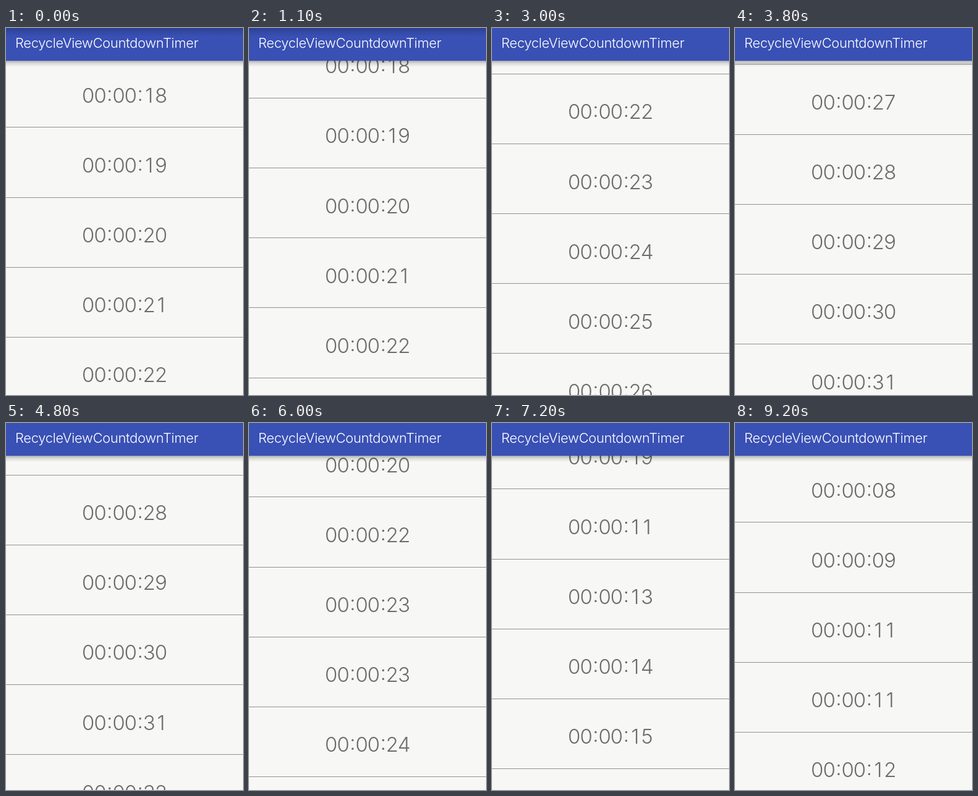
An HTML page with a canvas for the animation above (9400 ms loop, 384x594 px).

```html
<!DOCTYPE html>
<html lang="en">
<head>
<meta charset="utf-8">
<title>RecycleViewCountdownTimer</title>
<style>
  html, body { margin: 0; height: 100%; overflow: hidden; background: #f7f7f5; }
  canvas { display: block; }
</style>
</head>
<body>
<canvas id="stage" width="384" height="594"></canvas>
<script>
const ctx = document.getElementById('stage').getContext('2d');
const W = 384, H = 594, LOOP = 9400, STEP = 100;
const ROW = 113.15, ROWS = 20, BAR = 53, LINE = 160.45, BASELINE = 120.8;
const FONT = 'Inter, Roboto, sans-serif';

// Swipes up the list and back: [seconds, scroll offset]
const PATH = [[0.2, 0], [2.1, 485.6], [3, 765.5], [4.3, 1560], [4.4, 1560], [4.8, 1661],
  [5, 1718], [5.1, 1718], [5.5, 1330], [5.9, 1110], [6, 1059.4], [6.3, 430],
  [6.6, 325], [7, 205], [7.2, 54.1], [7.3, 0]];

const slope = k => (PATH[k + 1][1] - PATH[k][1]) / (PATH[k + 1][0] - PATH[k][0]);

function tangent(k) {
  if (k === 0 || k === PATH.length - 1) return 0;
  const a = slope(k - 1), b = slope(k);
  return a * b > 0 ? 2 * a * b / (a + b) : 0;
}

// Monotone cubic through the key points
function scrollAt(t) {
  const k = PATH.findIndex(p => p[0] >= t) - 1;
  if (k < 0) return 0;
  const [t0, y0] = PATH[k], [t1, y1] = PATH[k + 1];
  const h = t1 - t0, u = (t - t0) / h, v = 1 - u;
  return y0 * v * v * (1 + 2 * u) + y1 * u * u * (3 - 2 * u)
    + h * u * v * (v * tangent(k) - u * tangent(k + 1));
}

// On the way back the upper rows are bound again as they come out from under
// the bar, and tick from that moment; all others share one clock.
const END = 17.8, TURN = 5.1, REBOUND = 12, RECYCLED = 9;
const boundAt = Array.from({ length: REBOUND }, (_, i) => {
  let n = TURN * 10;
  while (scrollAt(n / 10) >= LINE - BAR + i * ROW) n++;
  return n / 10;
});

function secondsLeft(i, t) {
  const own = t >= boundAt[i];
  // A fresh row still shows the text of the row it was recycled from
  if (own && t === boundAt[i]) return secondsLeft(i + RECYCLED, t);
  const start = own ? boundAt[i] : 0.7, period = own ? 0.965 : 1.035;
  const lastTick = start + Math.floor((t - start) / period) * period;
  return Math.floor(END + i - lastTick);
}

function drawRow(i, t, scroll) {
  const y = i * ROW - scroll;
  if (y < -ROW || y > H) return;
  ctx.fillStyle = '#929292';
  ctx.fillRect(0, Math.round(LINE + y), W, 1);
  ctx.fillStyle = '#6c6c6c';
  ctx.font = '350 33px ' + FONT;
  ctx.textAlign = 'center';
  ctx.letterSpacing = '0px';
  const text = '00:00:' + String(secondsLeft(i, t)).padStart(2, '0');
  [...text].forEach((c, k) => {
    const colon = c === ':';
    const x = 133.3 + Math.floor(k / 3) * 49.3 + (colon ? 34.7 : k % 3 * 19.4);
    ctx.fillText(c, x, Math.round(BASELINE + y) - (colon ? 3 : 0));
  });
}

function fade(y, height, from, to) {
  const g = ctx.createLinearGradient(0, y, 0, y + height);
  g.addColorStop(0, `rgba(0,0,0,${from})`);
  g.addColorStop(0.4, `rgba(0,0,0,${to})`);
  g.addColorStop(1, 'rgba(0,0,0,0)');
  ctx.fillStyle = g;
  ctx.fillRect(0, y, W, height);
}

function drawBar(t) {
  fade(BAR, 10, 0.3, 0.12);
  ctx.fillStyle = '#3950b5';
  ctx.fillRect(0, 0, W, BAR);
  if (t < 1.3) fade(0, 14, 0.22, 0.1);
  ctx.fillStyle = '#fff';
  ctx.font = '350 22px ' + FONT;
  ctx.textAlign = 'left';
  ctx.letterSpacing = '-0.34px';
  ctx.fillText('RecycleViewCountdownTimer', 15, 32);
}

function draw(now) {
  const t = Math.floor(now % LOOP / STEP) / 10;
  const scroll = scrollAt(t);
  ctx.fillStyle = '#f7f7f5';
  ctx.fillRect(0, 0, W, H);
  for (let i = 0; i < ROWS; i++) drawRow(i, t, scroll);
  drawBar(t);
  requestAnimationFrame(draw);
}
draw(performance.now());
</script>
</body>
</html>
```
